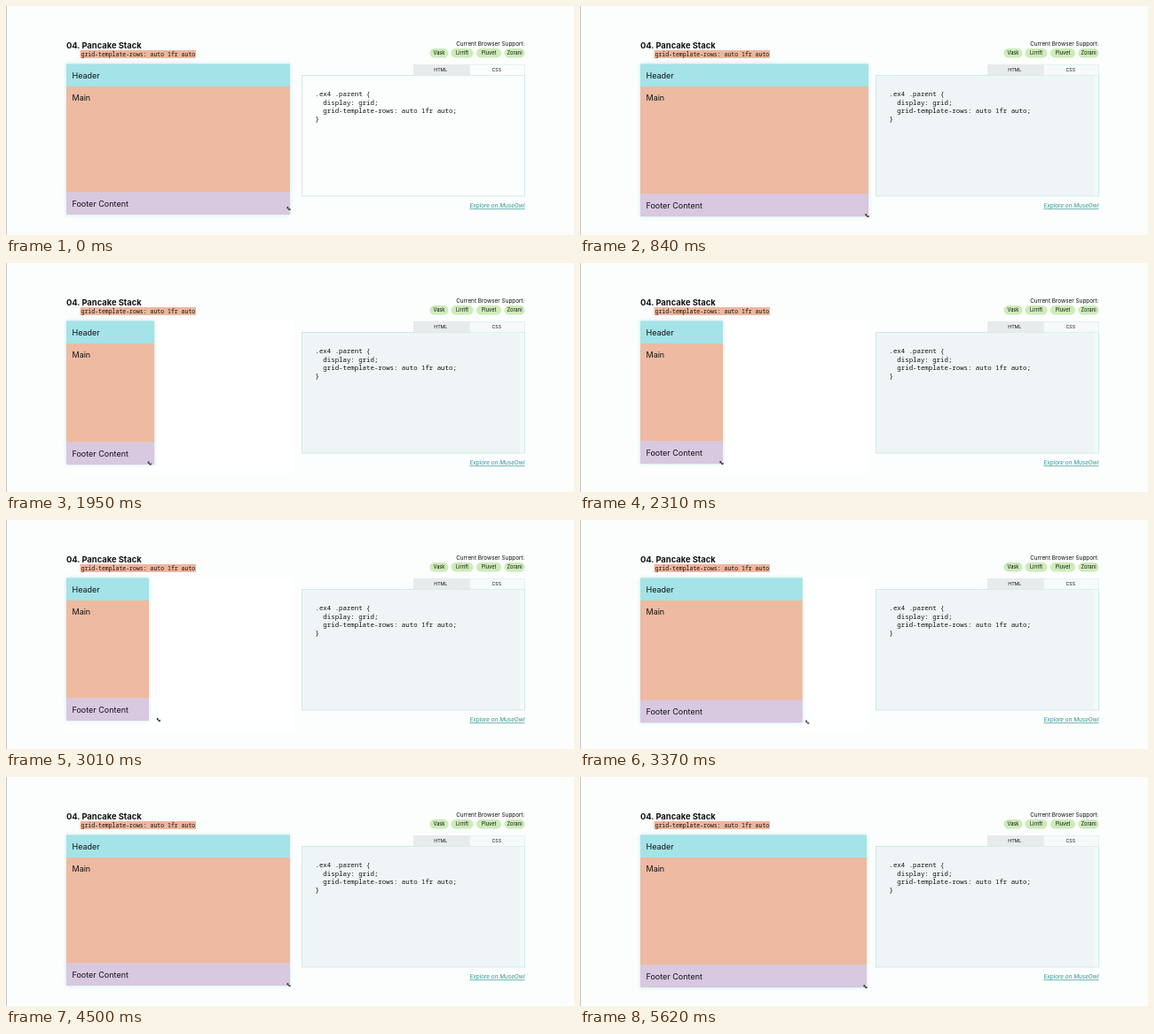
Write an HTML page that moves like this. It is 640 px wide and 259 px high and loops after 5740 ms.

```html
<!DOCTYPE html>
<html lang="en">
<head>
<meta charset="utf-8">
<title>Pancake Stack</title>
<style>
  html, body { margin: 0; height: 100%; overflow: hidden; background: #fbfefd; }
  svg { display: block; width: 100vw; height: 100vh; }
  text { font-family: Inter, sans-serif; fill: #111; white-space: pre; }
  .mono { font-family: "Noto Sans Mono", monospace; font-weight: 500; }
  .label { font-size: 9px; }
  .code { font-size: 7.38px; }
  .small { font-size: 6.4px; }
  .chip { font-size: 5.7px; text-anchor: middle; }
  .tab { font-size: 5.3px; text-anchor: middle; }
  .end { text-anchor: end; }
  .link { fill: #2b9292; font-style: italic; text-decoration: underline; }
  #card { filter: drop-shadow(0 0 2px #a9d9dc99); }
</style>
</head>
<body>
<svg viewBox="0 0 640 259">
  <rect width="640" height="259" fill="#fbfefd"/>
  <rect width="1" height="259" fill="#c4c6c6"/>

  <text x="68" y="47.7" font-size="9.4" font-weight="700">04. Pancake Stack</text>
  <rect x="83.5" y="50" width="130.5" height="9" fill="#eeb69d"/>
  <text class="mono" x="84.5" y="56.7" font-size="6.5">grid-template-rows: auto 1fr auto</text>

  <text class="small end" x="584.5" y="45">Current Browser Support:</text>
  <g id="chips"></g>

  <rect id="panel" x="333.5" y="78.5" width="251" height="136.5" stroke="#c5e6e6" stroke-width=".8"/>
  <rect id="strip" x="579" y="79" width="5" height="135.5" fill="#f4f9f9"/>
  <rect x="459" y="66" width="63" height="12.5" fill="#e8ebec"/>
  <rect id="tab" x="522.5" y="66.5" width="62" height="12" stroke="#dceeee" stroke-width=".7"/>
  <text class="tab" x="489.8" y="74">HTML</text>
  <text class="tab" x="552.8" y="74">CSS</text>
  <g id="code"></g>
  <text class="small link end" x="584.5" y="228">Explore on MuseOwl</text>

  <rect id="trail" x="68" y="65" width="257" height="173" fill="#fff"/>
  <g id="card">
    <rect id="main" x="68" y="91" fill="#eebaa2"/>
    <rect id="header" x="68" y="65.5" height="25.5" fill="#a4e3e7"/>
    <rect id="footer" x="68" height="25.3" fill="#d8c8e0"/>
  </g>
  <text class="label" x="74.5" y="81.5">Header</text>
  <text class="label" x="74.5" y="107">Main</text>
  <text class="label" id="footerText" x="74.5">Footer Content</text>
  <path id="cursor" d="M-2-2h2l-.7.7L.8.8 2-.4V2H-.4L.1 1.5-1.3 0-2 .6z" fill="#333"/>
</svg>
<script>
const $ = id => document.getElementById(id);
const set = (id, attrs) => {
  for (const name in attrs) $(id).setAttribute(name, attrs[name]);
};

$('chips').innerHTML = [['Vask', 477.5, 21], ['Lirrift', 501.5, 25], ['Pluvet', 530, 28], ['Zorani', 561.5, 23]]
  .map(([name, x, w]) => `<rect x="${x}" y="48" width="${w}" height="10.5" rx="5.2" fill="#cdecb8"/>
    <text class="chip" x="${x + w / 2}" y="55.3">${name}</text>`).join('');

$('code').innerHTML = ['.ex4 .parent {', '  display: grid;', '  grid-template-rows: auto 1fr auto;', '}']
  .map((line, i) => `<text class="mono code" x="348.5" y="${102.3 + i * 9.3}">${line}</text>`).join('');

const LOOP = 5740, STEP = 120, CURSOR_LEAD = 40;
const smooth = p => p * p * (3 - 2 * p);
const easeOut = p => 1 - (1 - p) ** 3;
const progress = (t, from, to) => Math.min(1, Math.max(0, (t - from) / (to - from)));

// The picture refreshes every STEP ms, and the count restarts at these times.
const restarts = [0, 1330, 1470, 3010, 3520, 4020, 5020];

function heldTime(t) {
  const start = restarts.findLast(r => r <= t);
  return t - (t - start) % STEP;
}

// Bottom-right corner of the card: nudge out, shrink, grow back, nudge out.
function cornerAt(t) {
  const nudge = progress(t, 600, 840);
  const shrink = smooth(progress(t, 1190, 2050));
  const grow = easeOut(progress(t, 3010, 4500));
  const settle = progress(t, 4500, 5500);
  return {
    x: 320 + 5 * nudge - 164 * shrink + 159 * grow + 3 * settle,
    y: 236 + 2 * nudge - 11 * shrink ** 2.5 + 9 * grow ** 2.5 + 2 * settle,
  };
}

function draw(now) {
  const t = heldTime(now);
  const corner = cornerAt(t), pointer = cornerAt(t + CURSOR_LEAD);
  const approach = 6 * (1 - progress(t, 0, 600));
  const width = corner.x - 68, footerTop = corner.y - 25.3;
  const tinted = t >= STEP;
  set('header', { width });
  set('main', { width, height: footerTop - 91 });
  set('footer', { width, y: footerTop });
  set('footerText', { y: corner.y - 9.4 });
  set('cursor', { transform: `translate(${pointer.x - 1.5} ${pointer.y - 1 - approach})` });
  set('panel', { fill: tinted ? '#eff5f6' : '#fbfefd' });
  set('tab', { fill: tinted ? '#f6fafa' : '#fbfefd' });
  set('strip', { opacity: +tinted });
  set('trail', { opacity: t < 840 ? 0 : 1 });
}

function tick() {
  draw(performance.now() % LOOP);
  requestAnimationFrame(tick);
}
tick();
</script>
</body>
</html>
```
